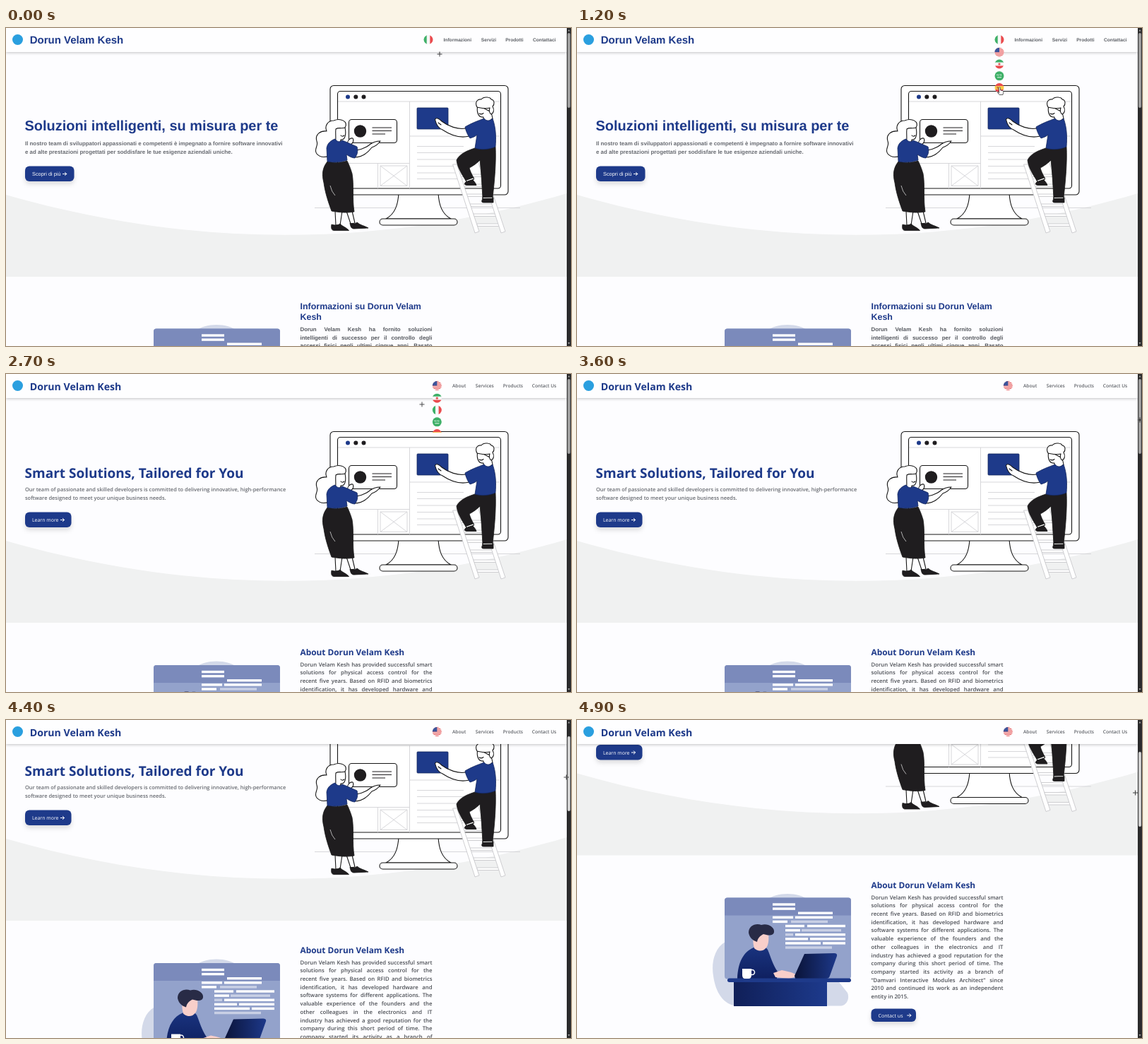
An HTML page that plays this animation: 800x450 px, repeating every 5 s.

```html
<!DOCTYPE html>
<html lang="en">
<head>
<meta charset="utf-8">
<title>Landing page</title>
<style>
html, body { margin: 0; width: 100%; height: 100%; overflow: hidden; background: #fdfdff; }
#stage { position: relative; width: 800px; height: 450px; overflow: hidden; text-rendering: geometricPrecision; }
#page, #head, svg.top { position: absolute; left: 0; top: 0; }
#page { width: 794px; height: 620px; }
#head { width: 794px; height: 33.5px; background: #fefeff; box-shadow: 0 1px 4px rgba(0,0,0,.24); }
svg { display: block; overflow: visible; }
.it { font-family: "Liberation Sans", Arial, sans-serif; font-weight: 700; }
.en { font-family: "Open Sans", "Noto Sans", sans-serif; font-weight: 600; }
.b { font-weight: 700; fill: #1e3a8a; }
.sub { fill: #676a70; }
.nav { fill: #5d6066; }
.btn { fill: #fff; font-weight: 400; }
.en .btn { font-weight: 500; }
p { position: absolute; left: 416.5px; width: 187px; margin: 0; line-height: 11.67px; color: #55585e; text-align: justify; }
p span { display: block; text-align-last: justify; }
p span:last-child { text-align-last: left; }
p.it { top: 421px; font-size: 7.89px; }
p.en { top: 406.8px; font-size: 7.75px; color: #4b4e54; }
.ink { fill: #fff; stroke: #161616; stroke-width: 1.1; stroke-linejoin: round; stroke-linecap: round; }
.dark { fill: #1f1d1f; stroke: #161616; stroke-width: .8; }
.blue { fill: #1e3a8a; stroke: #14265c; stroke-width: .8; }
.grey { fill: none; stroke: #d3d3d6; stroke-width: .9; }
.button { fill: #1e3a8a; filter: drop-shadow(0 4px 3px rgba(0,0,0,.13)); }
.arrow { fill: none; stroke: #fff; stroke-width: 1; stroke-linecap: round; stroke-linejoin: round; }
#cross { stroke: #b4b4b4; stroke-width: 1; mix-blend-mode: difference; }
</style>
</head>
<body>
<div id="stage">
  <div id="page">
    <svg width="794" height="620">
      <defs>
        <linearGradient id="body" x1="0" y1="0" x2="0" y2="1"><stop offset="0" stop-color="#1a3480"/><stop offset="1" stop-color="#0f2060"/></linearGradient>
        <linearGradient id="desk"><stop offset="0" stop-color="#101f58"/><stop offset="1" stop-color="#1d3a8c"/></linearGradient>
        <linearGradient id="lap"><stop offset="0" stop-color="#0a1338"/><stop offset="1" stop-color="#1d3889"/></linearGradient>
        <path id="arrow" class="arrow" d="M0 0H5.2M3 -2.2L5.2 0L3 2.2"/>
      </defs>
      <path fill="#f0f1f1" d="M0 236C265 312 530 312 794 234V352H0Z"/>

      <g id="hero">
        <path class="grey" d="M437 254.5H728"/>
        <path class="ink" d="M556 234C555 250 551 263 538 270H630C617 263 613 250 612 234Z"/>
        <rect class="ink" x="529" y="270" width="110" height="9" rx="4.5"/>
        <rect class="ink" x="459" y="81.5" width="252" height="154.5" rx="5"/>
        <rect class="ink" x="469.5" y="89.5" width="231" height="137.5" rx="4"/>
        <path class="grey" d="M470 104H700M571.5 104V227M470 191.5H571M571.5 153H700M526.5 191.5V227M530 195H568V223.5H530ZL568 223.5M568 195L530 223.5M582 167.5H648M582 176.5H648M582 186H648M582 195.5H648M582 205H648M582 213.5H648"/>
        <circle cx="484" cy="97.5" r="3" fill="#1e3a8a"/>
        <circle cx="495.3" cy="97.5" r="3" fill="#1f1d1f"/>
        <circle cx="506.5" cy="97.5" r="3" fill="#1f1d1f"/>
        <rect class="blue" x="582" y="113" width="44" height="30" rx="1"/>

        <g id="ladder" fill="#fff" stroke="#c9c9cc" stroke-width=".9" stroke-linejoin="round"></g>

        <g id="man">
          <path class="dark" d="M664 170C654 173 642 178 638 187C639 197 645 206 651 216L662 212C659 206 657 202 656 198C662 195 667 191 671 187C673 204 674 224 675 241L689 240C692 214 694 190 693 168C684 172 674 172 664 170Z"/>
          <path class="dark" d="M652 217C648 220 649 222.500 653 222.500H666C665 219 662 216 660 214ZM675 241C673 246 673 247 677 247H690V240Z"/>
          <path class="ink" d="M651 215.5L662 211.500L662.500 214L652 217.500ZM675 239.5L689 239L689 241L675 241.5Z"/>
          <path class="ink" d="M651 142C640 144 626 139 617 132C613 128 609 126 607.5 129.5C609 136 613 142 618 144C630 152 644 156 656 153Z"/>
          <path class="ink" d="M612 134L616 137"/>
          <path class="ink" d="M668 109C666 118 668 127 676 126L677 131C681 134 686 131 689 128L687 119Z"/>
          <path class="blue" d="M677 128C669 131 658 135 650 140C651 146 654 152 657 156C661 155 665 153 667 151L664 170C673 173 685 172 693 168C694 156 694 142 689 128C685 132 680 132 677 128Z"/>
          <path class="ink" d="M667 112C663 105 668 100 673 101C677 96 686 98 687 101C692 102 692 108 689 111C692 116 690 121 687 122C684 120 684 116 685 113C679 115 672 113 667 112Z"/>
          <path class="ink" d="M670 121Q673 123 676 120.5"/>
        </g>

        <g id="woman">
          <path class="ink" d="M480 141C485 132 474 127 464 131C455 131 451 139 454 146C446 145 437 150 440 160C443 167 435 172 440 178C445 184 452 183 458 181L468 158Z"/>
          <path class="ink" d="M466 259L467 279H473L476 259M482 259L488 277L494 276L490 259"/>
          <path class="dark" d="M461 278C460 283 461 287 465 286.5H485.5C482 282 476 281 473 277C469 280 465 279 461 278ZM487 276C488 282 489 284 493 284L513 283C508 280 501 279 497 275C494 278 490 277 487 276Z"/>
          <path class="dark" d="M455 189C448 198 447 207 450 219C452 234 457 248 461 259C472 261 483 262 493 260C490 242 493 222 490 206C488 199 485 192 483 188C474 191 464 191 455 189Z"/>
          <path d="M459 223Q461 232 466 237" fill="none" stroke="#eee" stroke-width=".7"/>
          <path class="ink" d="M467 143C466 150 468 158 466 163C470 166 474 163 474 158C480 159 482 151 480 141C474 143 471 140 467 143Z"/>
          <path class="ink" d="M474 152Q476 154.5 479 152"/>
          <rect class="ink" x="485.5" y="129.5" width="68" height="33" rx="4"/>
          <circle cx="501.5" cy="146" r="8.7" fill="#1f1d1f"/>
          <path d="M518.5 141H546M518.5 145.5H546M518.5 150H537" stroke="#1f1d1f" stroke-width="1"/>
          <path class="ink" d="M493 183C503 183 512 177 518 169C524 167 528 163 530 160C524 160 519 162 515 165C509 170 503 172 496 173Z"/>
          <path class="ink" d="M483 164C484 159 487 155 491 156C493 159 491 163 487 166Z"/>
          <path class="blue" d="M466 157C460 159 455 163 454 170L455 189C465 191 475 190 483 187L482 179C486 182 491 184 494 184C497 180 499 175 497 168C490 165 484 162 476 159C472 162 469 161 466 157Z"/>
        </g>
      </g>

      <g id="desktop">
        <g fill="#d3d9e9">
          <path d="M268 255C282 243 314 243 328 255Z"/>
          <path d="M210 314C194 323 190 345 193 362C196 385 207 403 226 404.5H374C383 403 386 393 383 386L364 362Z"/>
        </g>
        <rect x="209" y="251.5" width="179" height="115" rx="4" fill="#93a2cb"/>
        <path d="M209 276.5V255.5Q209 251.5 213 251.5H384Q388 251.5 388 255.5V276.5Z" fill="#7b8abb"/>
        <g id="code" fill="#fff"></g>
        <path fill="url(#body)" d="M227 366C228 342 236 328 250 322C258 318 266 319 270 325C274 334 277 346 284 356L283 366Z"/>
        <path fill="#f9cfca" d="M251 303C248 313 250 319 251 323C256 328 264 327 266 324C271 321 272 312 271 302ZM278 358L290 354C299 356 308 357 312 363L300 366L281 364Z"/>
        <path fill="#282b46" d="M243 301C243 291 253 287 261 290C270 287 280 293 279 300C278 306 270 305 264 303C260 305 256 308 255 314C248 312 244 307 243 301Z"/>
        <path fill="url(#lap)" d="M322 331L364 330Q369 330 368 334L358 362Q357 366 353 366H309L308 362Z"/>
        <rect x="222" y="370" width="132" height="35" fill="url(#desk)"/>
        <rect x="213" y="365.5" width="175" height="5.5" rx="2.7" fill="#1e3a8a"/>
        <path d="M234 352H247V361Q247 366 243 366H238Q234 366 234 361Z" fill="#fff"/>
        <circle cx="248" cy="357" r="3.5" fill="none" stroke="#fff" stroke-width="1.5"/>
      </g>

      <g class="it">
        <text class="b" x="26.5" y="145.3" font-size="19.95">Soluzioni intelligenti, su misura per te</text>
        <g class="sub" font-size="7.89">
          <text x="27" y="165.7">Il nostro team di sviluppatori appassionati e competenti è impegnato a fornire software innovativi</text>
          <text x="27" y="177.5">e ad alte prestazioni progettati per soddisfare le tue esigenze aziendali uniche.</text>
        </g>
        <rect class="button" x="27" y="195.5" width="69.5" height="21.5" rx="6"/>
        <text class="btn" x="37" y="208.8" font-size="7.36">Scopri di più</text>
        <use href="#arrow" x="80.5" y="206.5"/>
        <g class="b" font-size="12.45">
          <text x="416.5" y="397.5">Informazioni su Dorun Velam</text>
          <text x="416.5" y="412.5">Kesh</text>
        </g>
      </g>
      <g class="en">
        <text class="b" x="26.5" y="147" font-size="19.02">Smart Solutions, Tailored for You</text>
        <g class="sub" font-size="7.43">
          <text x="27" y="166">Our team of passionate and skilled developers is committed to delivering innovative, high-performance</text>
          <text x="27" y="177.7">software designed to meet your unique business needs.</text>
        </g>
        <rect class="button" x="27" y="195.5" width="65.5" height="21.5" rx="6"/>
        <text class="btn" x="37" y="209" font-size="6.95">Learn more</text>
        <use href="#arrow" x="77.3" y="206.5"/>
        <text class="b" x="416.5" y="398.3" font-size="11.85">About Dorun Velam Kesh</text>
        <rect class="button" x="416.5" y="569" width="63.5" height="18.5" rx="6"/>
        <text class="btn" x="426.5" y="581" font-size="7.1">Contact us</text>
        <use href="#arrow" x="467.7" y="578.5"/>
      </g>
    </svg>
    <p class="it"><span>Dorun Velam Kesh ha fornito soluzioni</span><span>intelligenti di successo per il controllo degli</span><span>accessi fisici negli ultimi cinque anni. Basato</span><span></span></p>
    <p class="en"><span>Dorun Velam Kesh has provided successful smart</span><span>solutions for physical access control for the</span><span>recent five years. Based on RFID and biometrics</span><span>identification, it has developed hardware and</span><span>software systems for different applications. The</span><span>valuable experience of the founders and the</span><span>other colleagues in the electronics and IT</span><span>industry has achieved a good reputation for the</span><span>company during this short period of time. The</span><span>company started its activity as a branch of</span><span>“Damvari Interactive Modules Architect” since</span><span>2010 and continued its work as an independent</span><span>entity in 2015.</span></p>
  </div>

  <div id="head"></div>
  <svg class="top" width="800" height="450">
    <defs>
      <clipPath id="disc"><circle r="6.5"/></clipPath>
      <clipPath id="drop"><rect id="dropBox" x="580" y="25" width="60" height="0"/></clipPath>
    </defs>
    <circle cx="16.5" cy="16.5" r="7.5" fill="#2a9fdf"/>
    <g class="it">
      <text class="b" x="33.7" y="21.8" font-size="15">Dorun Velam Kesh</text>
      <g class="nav" font-size="6.65">
        <text x="619.5" y="19">Informazioni</text><text x="672.8" y="19">Servizi</text>
        <text x="707.2" y="19">Prodotti</text><text x="746" y="19">Contattaci</text>
      </g>
    </g>
    <g class="en">
      <text class="b" x="33.7" y="22.7" font-size="14.15">Dorun Velam Kesh</text>
      <g class="nav" font-size="6.6">
        <text x="632" y="19.2">About</text><text x="664.8" y="19.2">Services</text>
        <text x="703.8" y="19.2">Products</text><text x="744.8" y="19.2">Contact Us</text>
      </g>
    </g>
    <g class="it" id="flagsIt"></g>
    <g class="en" id="flagsEn"></g>
    <rect x="794" width="6" height="450" fill="#2b2b2c"/>
    <rect id="thumb" x="795" y="7" width="4" height="106" rx="2" fill="#9f9f9f"/>
    <path d="M795.5 4.5L797 2L798.5 4.5ZM795.5 445L797 447.5L798.5 445Z" fill="#a8a8a8"/>
    <g id="hand"><path d="M-1.5 4.5V-3.5Q-.5 -5 .5 -3.5V0L4 .8Q5 1.2 4.8 2.5L4 6.5H-1L-4 2.8Q-3.8 1.5 -1.5 3.3" fill="#fff" stroke="#222" stroke-width=".7" stroke-linejoin="round"/></g>
    <path id="cross" d="M-3.5 0H3.5M0 -3.5V3.5"/>
  </svg>
</div>
<script>
const $ = id => document.getElementById(id);
const box = (x, y, w, h, fill, o = 1) =>
  `<rect x="${x}" y="${y}" width="${w}" height="${h}" fill="${fill}" opacity="${o}"/>`;

// Flags, drawn around (0, 0)
const RED = '#ea4b4e', GREEN = '#3fb068', WHITE = '#f7f7f7';
const bands = (a, b, c) => box(-7, -7, 14, 5, a) + box(-7, -2.4, 14, 4.8, b) + box(-7, 2.4, 14, 5, c);
const FLAGS = {
  it: box(-7, -7, 5, 14, GREEN) + box(-2.3, -7, 4.6, 14, WHITE) + box(2.3, -7, 5, 14, RED),
  us: box(-7, -7, 14, 14, WHITE) +
    [0, 1, 2, 3, 4, 5, 6].map(i => box(-7, -6.5 + i * 2, 14, 1, RED)).join('') + box(-7, -7, 7, 7, '#3b559c'),
  ir: bands(GREEN, WHITE, RED) + '<circle r="1.6" fill="#e2575a"/>',
  sa: box(-7, -7, 14, 14, GREEN) +
    '<path d="M-4 -1.5H-2.5M-1.5 -2V-.5M0 -1.5H1.5M2.5 -2V-.5M-3 2H3" stroke="#fff" stroke-width=".9"/>',
  es: bands(RED, '#f8cc45', RED) + box(-3.5, -1.5, 2.5, 3, '#c9743c')
};
const flag = (k, x, y) => `<g transform="translate(${x} ${y})"><g clip-path="url(#disc)">${FLAGS[k]}</g></g>`;
const menu = (x, [first, ...rest]) => flag(first, x, 16.5) +
  `<g clip-path="url(#drop)">${rest.map((k, i) => flag(k, x, 34.2 + i * 16.8)).join('')}</g>`;
$('flagsIt').innerHTML = menu(598, ['it', 'us', 'ir', 'sa', 'es']);
$('flagsEn').innerHTML = menu(610.3, ['us', 'ir', 'it', 'sa', 'es']);

// Ladder: rungs between two slanted rails
const rail = (x, y, x2) => `<path d="M${x} ${y}H${x + 6}L${x2 + 6} 288L${x2} 290Z"/>`;
let rungs = '';
for (let y = 207; y < 282; y += 14) {
  const x = 638 + (y - 193) * .34;
  rungs += `<path d="M${x} ${y}h34l1 3.5h-34z"/>`;
}
$('ladder').innerHTML = rungs + rail(632.5, 193, 664) + rail(667, 185, 701);

// Code on the screen: row, start, end, opacity
$('code').innerHTML = [
  [0, 277, 309, 1], [1, 277, 309, 1], [2, 313, 362, 1], [3, 277, 306, 1], [3, 309, 362, 1],
  [4, 277, 298, 1], [4, 303, 355, .5], [5, 295, 322, 1], [5, 326, 380, 1], [6, 295, 316, 1],
  [6, 318, 374, .5], [7, 295, 306, .5], [7, 309, 380, 1], [8, 295, 327, 1], [8, 330, 380, 1],
  [9, 295, 345, 1], [9, 348, 380, 1], [10, 295, 361, .5]
].map(([r, a, b, o]) => box(a, 259.3 + r * 6.1, b - a, 3.4, '#fff', o)).join('');

// Motion tables: time, values
const LOOP = 5000, STEP = 100, SWITCH = 2200;
const CURSOR = [
  [0, 614, 37], [300, 604, 22], [400, 599, 18], [800, 599, 45], [1200, 599, 88], [1400, 599, 84],
  [1900, 599, 40], [2100, 598, 35], [2400, 597, 36], [2700, 589, 43], [3000, 640, 55],
  [3400, 775, 64], [3600, 797, 65], [3900, 797, 65], [4200, 795, 71], [4600, 791.5, 91], [4900, 790.5, 103]
];
const SCROLL = [
  [3800, 0], [3900, 1], [4000, 5], [4100, 14], [4200, 26.7], [4300, 46], [4400, 68],
  [4600, 110], [4700, 129], [4800, 146], [4900, 160.5]
];
const MENU = [[400, 0], [600, 70], [2600, 70], [2700, 58], [2900, 0]];

function at(table, t) {
  const n = table.findIndex(row => row[0] > t);
  if (n < 0) return table[table.length - 1].slice(1);
  if (n === 0) return table[0].slice(1);
  const a = table[n - 1], b = table[n], k = (t - a[0]) / (b[0] - a[0]);
  return a.slice(1).map((v, i) => v + (b[i + 1] - v) * k);
}

const langs = { it: document.querySelectorAll('.it'), en: document.querySelectorAll('.en') };
let shown = '';
function setLang(lang) {
  if (lang === shown) return;
  shown = lang;
  for (const k in langs) langs[k].forEach(el => { el.style.display = k === lang ? '' : 'none'; });
  $('desktop').setAttribute('transform', `translate(0 ${lang === 'it' ? 174 : 160.5})`);
}

function draw(time) {
  const t = Math.floor(time % LOOP / STEP) * STEP;
  const [x, y] = at(CURSOR, t), [scroll] = at(SCROLL, t), [drop] = at(MENU, t);
  const overFlag = t >= 400 && t < SWITCH;
  setLang(t < SWITCH ? 'it' : 'en');
  $('page').style.transform = `translateY(${-scroll}px)`;
  $('dropBox').setAttribute('height', drop);
  $('thumb').setAttribute('y', 7 + scroll / 4.22);
  $('thumb').setAttribute('fill', t >= 3800 ? '#d2d2d2' : '#9f9f9f');
  for (const id of ['hand', 'cross']) {
    $(id).setAttribute('transform', `translate(${x} ${y})`);
    $(id).style.display = (id === 'hand') === overFlag ? '' : 'none';
  }
}

const start = performance.now();
function tick() {
  draw(performance.now() - start);
  requestAnimationFrame(tick);
}
tick();
</script>
</body>
</html>
```
